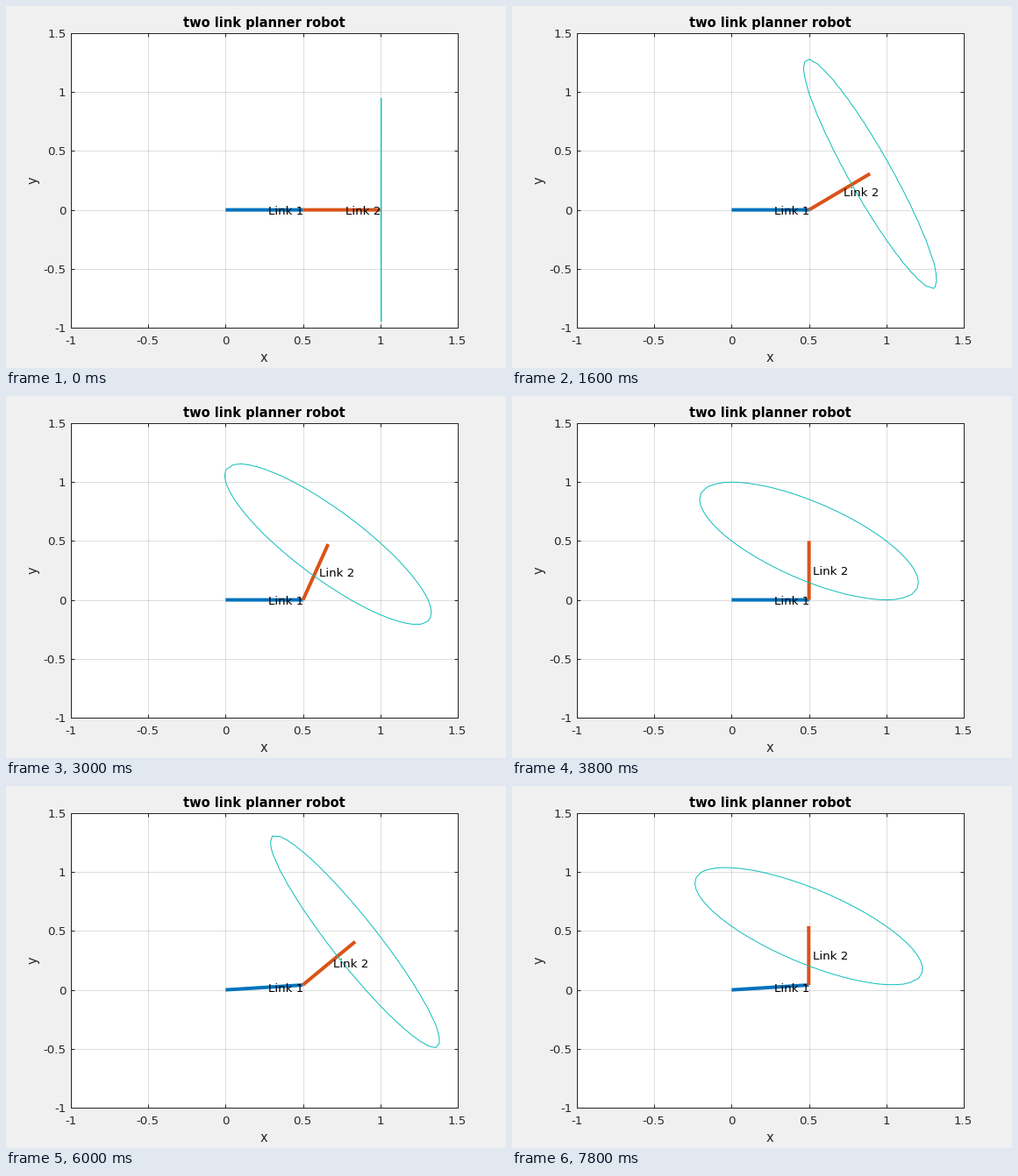
A matplotlib script that plays this animation: 570 by 413 pixels, repeating every 8 s.

```python
import numpy as np
import matplotlib.pyplot as plt
from matplotlib.animation import FuncAnimation

W, H, DPI = 570, 413, 64
PX = 72 / DPI                      # one pixel in points
LEFT, BOTTOM, WIDE, HIGH = 74, 46, 441, 336   # plot box in pixels
L = 0.5                            # length of each link
SWEEP = 20                         # poses of link 2 per pose of link 1
STEP = np.pi / 2 / (SWEEP - 1)
FRAMES, INTERVAL = 40, 200
DAMP = 1e-4                        # keeps the ellipse finite when the arm is straight
TEAL, INK = "#12beb9", "#262626"

plt.rcParams["font.family"] = "DejaVu Sans"
fig = plt.figure(figsize=(W / DPI, H / DPI), dpi=DPI, facecolor="#f0f0f0")
ax = fig.add_axes([LEFT / W, BOTTOM / H, WIDE / W, HIGH / H], facecolor="white")
ax.set(xlim=(-1, 1.5), ylim=(-1, 1.5), autoscale_on=False)
ticks = np.arange(-1, 1.6, 0.5)
ax.set_xticks(ticks)
ax.set_yticks(ticks)
ax.set_axisbelow(True)
ax.grid(color=INK, alpha=0.15, lw=PX)
ax.tick_params(direction="in", length=4.4 * PX, width=PX, color=INK,
               top=True, right=True, labelbottom=False, labelleft=False)
for spine in ax.spines.values():
    spine.set(color=INK, linewidth=PX)


def put(x, y, text, size=13.33, color=INK, **kw):
    """Text at a pixel position counted from the bottom left corner."""
    kw = {"ha": "center", "va": "baseline", **kw}
    fig.text(x / W, y / H, text, fontsize=size * PX, color=color, **kw)


for v in ticks:
    part = (v + 1) / 2.5
    put(LEFT + part * WIDE - 0.4, 27, f"{v:g}")
    put(68.5, BOTTOM + part * HIGH - 5, f"{v:g}", ha="right")
put(294.5, 389, "two link planner robot", 14.67, "black", weight="bold")
put(293.8, 7, "x", 14.67)
put(31.5, 214, "y", 14.67, rotation=90, va="center")

links = [ax.plot([], [], color=c, lw=4 * PX, solid_capstyle="butt",
                 snap=False, zorder=3)[0]
         for c in ("#0072bd", "#d95319")]
labels = [ax.annotate(f"Link {i}", (0, 0), xytext=(4.4, -5),
                      textcoords="offset pixels", fontsize=13.33 * PX,
                      color="black", va="baseline", zorder=6)
          for i in (1, 2)]

# coarse mesh: its spacing gives thin ellipses their ragged outline
mesh = np.arange(-26, 36) * 4 * np.pi / 250
X, Y = np.meshgrid(mesh, mesh)
curves = []


def clear():
    while curves:
        curves.pop().remove()


def draw_ellipse(elbow, tip):
    """Velocity ellipse of the arm, centred on its tip."""
    (x, y), (u, v) = tip, tip - elbow
    jac = np.array([[-y, -v], [x, u]])
    m = np.linalg.inv(jac @ jac.T + DAMP * np.eye(2))
    dx, dy = X - x, Y - y
    f = m[0, 0] * dx**2 + 2 * m[0, 1] * dx * dy + m[1, 1] * dy**2 - 1
    if f.min() < 0:
        curves.append(ax.contour(X, Y, f, levels=[0], colors=TEAL,
                                 linewidths=PX, zorder=4))


def polar(angle):
    return L * np.array([np.cos(angle), np.sin(angle)])


def draw(n):
    clear()
    elbow = polar(n // SWEEP * STEP)
    tip = elbow + polar(n % SWEEP * STEP)
    joints = [np.zeros(2), elbow, tip]
    for link, label, a, b in zip(links, labels, joints, joints[1:]):
        link.set_data([a[0], b[0]], [a[1], b[1]])
        label.xy = tuple((a + b) / 2)
    draw_ellipse(elbow, tip)
    return links + labels


def reset():
    return draw(0)


anim = FuncAnimation(fig, draw, frames=FRAMES, init_func=reset,
                     interval=INTERVAL, repeat=True, repeat_delay=0, blit=False)
plt.show()
```
